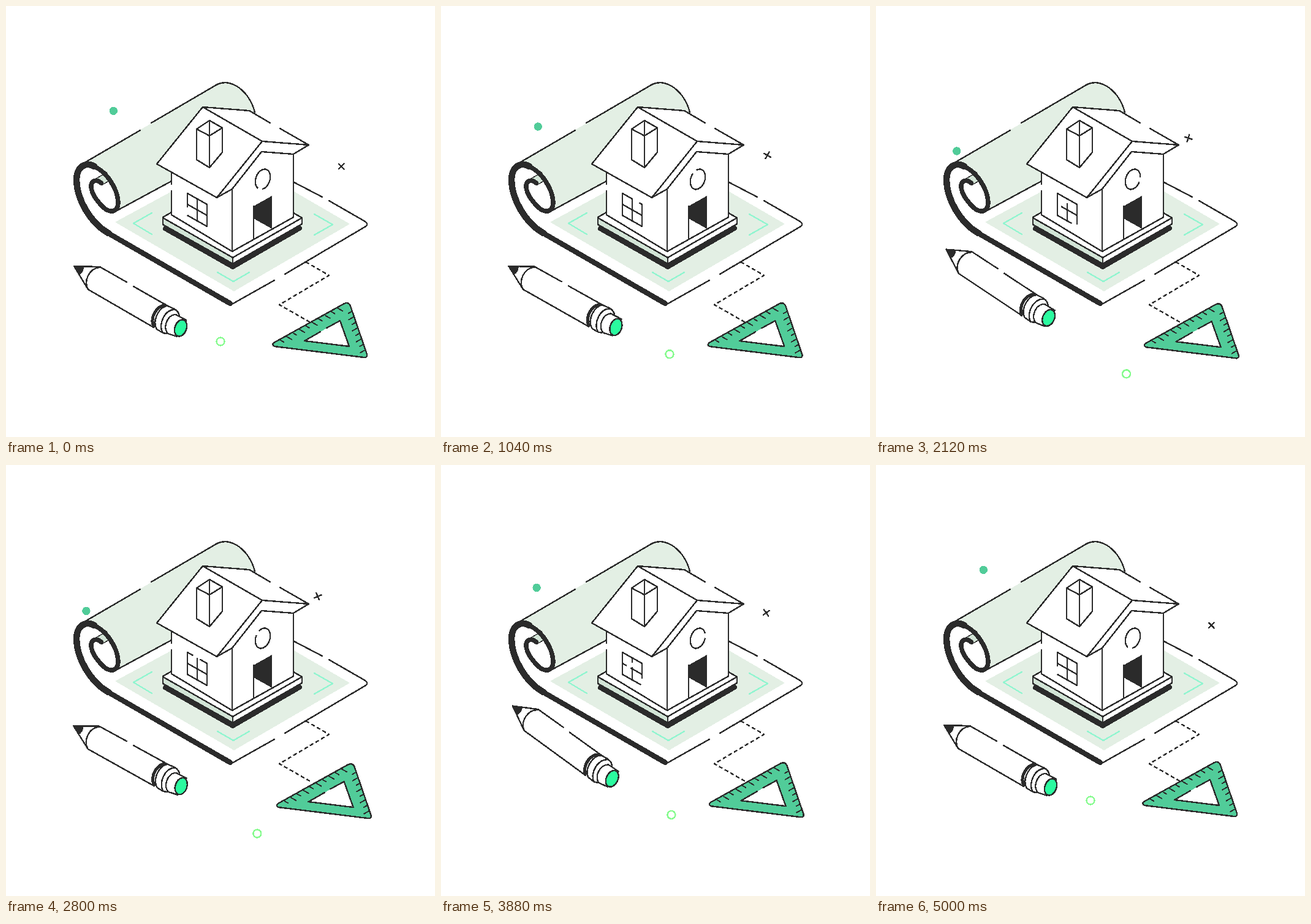
Animation of 700 by 704 pixels, one loop 5.04 s. Source, as an HTML page:

```html
<!DOCTYPE html>
<html lang="en">
<head>
<meta charset="utf-8">
<style>
  html, body { margin: 0; height: 100%; overflow: hidden; background: #fff; }
  svg { display: block; width: 100vw; height: 100vh; }
  .line { fill: none; }
  .white { fill: #fff; }
  .pale { fill: #e3efe4; }
  .flat { stroke: none; }
  .ink { fill: #2b2b2b; }
</style>
</head>
<body>
<svg viewBox="0 0 700 704" stroke="#2b2b2b" stroke-width="2.4" stroke-linecap="round" stroke-linejoin="round" shape-rendering="crispEdges">
  <g id="sheet">
    <path class="pale flat" d="M178 353L367 243L561 356L372 466Z"/>
    <path class="line" d="M470 288L516 312M527 318L586 352Q592 356 587 360L455 438M438 448L367 488"/>
    <path class="line" stroke="#92f5d0" d="M238 338L208 355L238 373M503 340L533 357L503 374M345 435L371 450L397 435"/>
  </g>

  <g id="roll">
    <path class="white flat" d="M175 338L270 286V303L178 353Z"/>
    <path class="pale flat" d="M128 256L345 128C370 117 400 143 407 178V208L175 338Z"/>
    <path class="line" d="M128 256L219 203M237 191L343 129C368 115 399 142 406 174M174 338L270 286"/>
    <path class="white flat" d="M165 370C135 352 116 315 115 285C115 262 130 254 146 262C168 274 182 302 184 322C183 338 168 338 158 328Z"/>
    <path fill="#d2e4d6" d="M147 282L164 272L171 284L157 292Z" stroke-width="1.5"/>
    <path class="line" stroke-width="8.5" d="M366 486L165 370"/>
    <path class="line" stroke-width="10.5" d="M167 371C136 353 116 315 115 285C115 262 130 254 144 262"/>
    <path class="line" stroke-width="7.5" d="M138 260C165 268 182 300 183 320C183 339 168 338 158 328C146 316 138 304 139 292C141 283 150 284 155 289"/>
  </g>

  <g id="house">
    <path class="line" stroke-width="8" d="M260 363.5L370 426L479 363"/>
    <path class="white" d="M270 337L256 345V357L370 421L483 356V346L469 338L369 300Z"/>
    <path fill="#d2e4d6" d="M256 346L370 411V421L256 357Z"/>
    <path class="line" d="M370 421V411L483 346"/>
    <path class="white flat" d="M270 265V341L369 401L469 345V242L418 230L344 300Z"/>
    <path class="line" d="M270 273V291M270 302V341L369 401V300M369 401L469 345V242"/>
    <path class="white flat" d="M246 258L321 165L397 171L494 227L469 242L417 238L369 299L344 313Z"/>
    <path class="line" d="M431 191L397 171L321 165L246 258L344 313L418 221L494 227L447 200M321 165L418 221M494 227L469 242L417 238L369 299L344 313"/>
    <path class="white" d="M311 201L332 187L353 199V239L332 264L311 251Z"/>
    <path class="line" d="M311 201L332 212L353 199M332 187V264"/>
    <path class="ink flat" d="M404 327L434 310V364L404 347Z"/>
    <path class="line" d="M404 327V380"/>
    <path id="frame" class="line" d="M296 306V342L328 360V324Z" pathLength="148" stroke-dasharray="135 13" stroke-linecap="butt"/>
    <path id="bars" class="line" d="M312 315V351M296 324L328 342" stroke-dasharray="141 7" stroke-linecap="butt"/>
    <ellipse id="porthole" class="line" cx="419" cy="283" rx="11.5" ry="17" transform="rotate(20 419 283)" pathLength="360" stroke-dasharray="330 30" stroke-linecap="butt"/>
  </g>

  <path class="line" stroke-linecap="butt" stroke-dasharray="6.5 4" d="M489 418L527 440L446 488L497 517"/>

  <g id="ruler">
    <path fill="#51cc99" d="M437 550L552 486Q559 483 562 490L589 569Q590 575 584 574L438 556Q433 554 437 550Z"/>
    <path class="white flat" d="M487 547L545 514L560 556Z"/>
    <path class="line" d="M513 532L487 547L560 556L545 514L523 526"/>
    <path id="ticks" class="line" stroke-width="2"/>
  </g>

  <g id="pencil">
    <path class="white flat" d="M111 425L152 426L293 513L280 539L256 534L134 463Z"/>
    <path class="line" d="M134 463L111 425L153 426L197 451M208 458L264 490M134 463L241 525M153 427C136 428 126 449 134 463"/>
    <path class="ink" d="M111 425L126 427Q125 435 119 438Z"/>
    <path class="line" stroke-width="5" stroke-linecap="butt" d="M261 489C245 488 233 512 242 525"/>
    <path class="white" d="M264 490C250 490 238 514 246 528L256 534Q263 536 269 533L283 507Q282 499 275 495Z"/>
    <path class="line" d="M276 496C260 494 247 520 256 534"/>
    <path class="white" d="M277 504C264 504 255 524 264 535L279 540L294 513Z"/>
    <ellipse cx="285" cy="526" rx="9.5" ry="14" transform="rotate(20 285 526)" fill="#2bfa9f"/>
  </g>

  <circle id="dot" class="flat" cx="175.3" cy="171.3" r="6.7" fill="#51cc99"/>
  <circle id="ring" class="line" cx="350" cy="548" r="6.5" stroke="#86fb8e" stroke-width="2.5"/>
  <path id="cross" class="line" d="M-4.3 -4.3L4.3 4.3M4.3 -4.3L-4.3 4.3"/>
</svg>
<script>
const LOOP = 5040, CYCLE = 5000;
const get = id => document.getElementById(id);
const move = (id, transform) => get(id).setAttribute('transform', transform);
const dash = (id, offset) => get(id).setAttribute('stroke-dashoffset', offset);

const wave = x => (1 - Math.cos(2 * Math.PI * x)) / 2;
const smooth = u => wave(u / 2);
const out = u => Math.sin(u * Math.PI / 2);

// Keys are [phase, value, easing into this key]
function keyed(keys, p) {
  const i = Math.max(1, keys.findIndex(k => k[0] >= p));
  const [p0, v0] = keys[i - 1], [p1, v1, ease] = keys[i];
  return v0 + (v1 - v0) * ease((p - p0) / (p1 - p0));
}
const lift = [[0, 0], [.3, -22.5, smooth], [.36, -22.5, smooth], [.66, 0, smooth], [1, 0, smooth]];
const tilt = [[0, 0], [.1, -9.4, smooth], [.4, 7.2, out], [.66, -.9, smooth], [.92, 0, smooth], [1, 0, smooth]];

function tickPath(count, x, y, stepX, stepY, dirX, dirY) {
  let d = '';
  for (let i = 0; i < count; i++) {
    const length = i % 2 ? 9 : 6;
    d += `M${x + i * stepX} ${y + i * stepY}l${dirX * length} ${dirY * length}`;
  }
  return d;
}
get('ticks').setAttribute('d',
  tickPath(10, 448, 546, 10.4, -5.8, .87, .5) + tickPath(8, 564, 499, 3.1, 9, -.87, .5));

function draw(now) {
  const turn = Math.min(now % LOOP, CYCLE) / CYCLE;
  const drift = wave(turn);
  const phase = turn * 3 % 1;
  const slide = wave(turn * 5);

  move('dot', `translate(${-46 * drift} ${69.5 * drift})`);
  move('ring', `translate(${62 * drift} ${56 * drift})`);
  move('cross', `translate(${547.3 - 40 * drift} ${262 - 49 * drift}) rotate(${360 * turn})`);
  move('ruler', `translate(${19.3 * slide} ${9 * slide})`);
  move('pencil', `translate(0 ${keyed(lift, phase)}) rotate(${keyed(tilt, phase)} 198 476)`);

  // Each offset places the middle of the single gap along its path
  dash('frame', 141.5 - 30 - 148 * phase);
  dash('bars', 144.5 + 37 - 148 * phase);
  dash('porthole', 345 - 85 + 360 * phase);
  requestAnimationFrame(draw);
}
requestAnimationFrame(draw);
</script>
</body>
</html>
```
